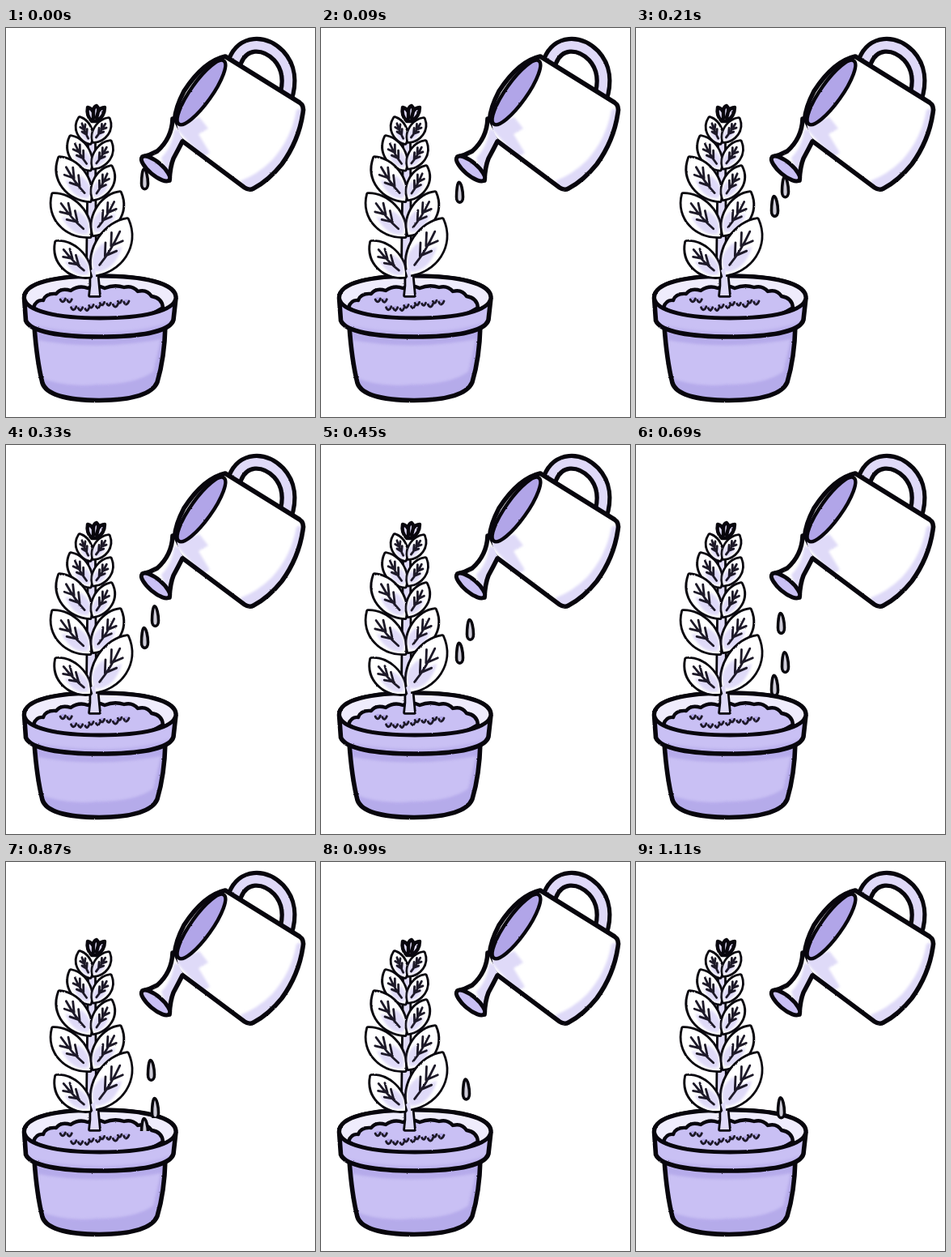
These frames come from a looping animation (382x480 px, 1170 ms). An HTML page:

```html
<!DOCTYPE html>
<html lang="en">
<head>
<meta charset="utf-8">
<title>Watering a plant</title>
<style>
  html, body { margin: 0; width: 100%; height: 100%; overflow: hidden; background: #fff; }
  svg { display: block; width: 100%; height: 100%; }
  .ink { fill: none; stroke: #08060d; stroke-width: 5.6; stroke-linecap: round; stroke-linejoin: round; }
  .fine { stroke-width: 4.4; }
  .vein { stroke-width: 2.8; stroke: #1d1928; }
  .mid { fill: #c9c0f4; }
  .pale { fill: #dfdaf8; }
  .deep { fill: #b1a5e8; }
  .white { fill: #fff; }
  .wash { filter: url(#soft); }
  .drop { fill: #cfcdd9; stroke: #08060d; stroke-width: 3.6; stroke-linejoin: round; }
</style>
</head>
<body>
<svg viewBox="0 0 382 480">
  <defs>
    <filter id="rough" x="0" y="0" width="382" height="480" filterUnits="userSpaceOnUse" color-interpolation-filters="sRGB">
      <feTurbulence type="fractalNoise" baseFrequency=".35" numOctaves="2" seed="4"/>
      <feDisplacementMap in="SourceGraphic" scale="1.6" xChannelSelector="R" yChannelSelector="G"/>
    </filter>
    <filter id="soft"><feGaussianBlur stdDeviation="1.8"/></filter>
    <path id="potBody" d="M35 368 Q38 410 45 438 Q52 459 115 459.500 Q178 459 187 437 Q196 407 197 367 Z"/>
    <path id="potRim" d="M22.500 333 C22.500 314 62 306 116 306 C170 306 210 315 210 333 L207 360 C203 375 165 381 115 381 C68 381 30 375 24.500 361 Z"/>
    <path id="mouth" d="M22.500 333 C22.500 314 62 306 116 306 C170 306 210 315 210 333 C208 350 167 358 116 358 C66 358 24 350 22.500 333 Z"/>
    <path id="soil" d="M34 345 Q37 335 46 336 Q49 327 62 328 Q68 320 80 324 Q90 317 101 321 Q112 316 122 321 Q134 316 146 320 Q156 317 163 325 Q174 322 180 331 Q193 333 194 345 Q160 366 116 366 Q67 366 34 345 Z"/>
    <path id="canBody" d="M271 35 L363 92 Q369 96 367 105 Q362 139 341 168 Q325 188 306 198 Q301 201 295 197 L216 138 Q199 118 220 78 Q244 41 271 35 Z"/>
    <path id="spout" d="M206 112 Q205 136 187 152 Q178 157 169 159 L202 188 Q203 171 207 161 Q213 150 220 141 Z"/>
    <path id="handle" d="M283 41 C293 16 319 16 337 34 C350 48 352 67 345 88"/>
    <clipPath id="bodyClip"><use href="#potBody"/></clipPath>
    <clipPath id="rimClip"><use href="#potRim"/></clipPath>
    <clipPath id="mouthClip"><use href="#mouth"/></clipPath>
    <clipPath id="canClip"><use href="#canBody"/></clipPath>
    <clipPath id="spoutClip"><use href="#spout"/></clipPath>
  </defs>

  <g filter="url(#rough)">
    <use href="#potBody" class="mid"/>
    <g clip-path="url(#bodyClip)">
      <path class="deep wash" opacity=".8" d="M30 372 Q110 396 202 370 V382 Q115 400 34 384 Z"/>
      <path class="deep wash" opacity=".8" d="M40 430 Q70 444 112 440 Q160 440 182 424 L194 374 H206 V466 H36 Z"/>
    </g>
    <use href="#potBody" class="ink"/>
    <use href="#potRim" class="mid"/>
    <path clip-path="url(#rimClip)" class="deep wash" opacity=".5" d="M20 364 Q60 374 116 375 Q172 375 211 360 V385 H20 Z"/>
    <use href="#potRim" class="ink"/>
    <use href="#mouth" fill="#efecfc"/>
    <g clip-path="url(#mouthClip)">
      <use href="#soil" class="mid"/>
      <use href="#soil" class="ink fine"/>
      <g id="pebbles"></g>
    </g>
    <use href="#mouth" class="ink" style="stroke-width:5"/>
    <g id="plant"></g>
  </g>

  <g id="drops"></g>

  <g filter="url(#rough)">
    <use href="#handle" class="ink" style="stroke-width:21"/>
    <use href="#handle" fill="none" stroke="#dfd9f8" stroke-width="10.500"/>
    <use href="#canBody" class="white"/>
    <g clip-path="url(#canClip)">
      <path class="pale wash" d="M372 98 L359 101 Q353 136 329 163 Q311 181 289 189 L300 206 Q355 187 372 98 Z"/>
      <path class="pale wash" d="M208 121 L239 110 L250 124 L238 131 L252 154 L243 160 Z"/>
    </g>
    <use href="#canBody" class="ink"/>
    <g transform="translate(241.500 79.500) rotate(-54.500)">
      <ellipse class="deep" rx="48" ry="13"/>
      <ellipse class="ink fine" rx="48" ry="13"/>
    </g>
    <use href="#spout" class="white"/>
    <path clip-path="url(#spoutClip)" class="pale wash" d="M226 132 L208 124 Q206 146 192 160 L202 188 Z"/>
    <path class="ink" d="M206 112 Q205 136 187 152 Q178 157 169 159 M202 188 Q203 171 207 161 Q213 150 218 140"/>
    <g transform="translate(185 173.500) rotate(40)">
      <ellipse class="mid" rx="22" ry="8"/>
      <ellipse class="ink" rx="22" ry="8" style="stroke-width:5"/>
    </g>
  </g>
</svg>
<script>
const NS = 'http://www.w3.org/2000/svg';
const $ = id => document.getElementById(id);

function add(parent, tag, attrs) {
  const el = document.createElementNS(NS, tag);
  for (const k in attrs) el.setAttribute(k, attrs[k]);
  parent.append(el);
  return el;
}

const path = (parent, d, cls) => add(parent, 'path', { d, class: cls });

// Runs from base to tip; p(a, c) is a of the way along and c pixels towards the underside.
function leaf(g, bx, by, tx, ty) {
  const dx = tx - bx, dy = ty - by, len = Math.hypot(dx, dy);
  const side = Math.sign(dx), w = len * .25;
  const p = (a, c) => [bx + dx * a - dy / len * c * side, by + dy * a + dx / len * c * side].map(n => n.toFixed(1)).join(' ');
  const shape = `M${p(0, 0)} C${p(.25, w * 1.3)} ${p(.75, w * 1.5)} ${p(1, 0)} C${p(.8, -w)} ${p(.3, -w * 1.3)} ${p(0, 0)} Z`;
  path(g, shape, 'ink');
  path(g, shape, 'white');
  path(g, `M${p(.06, 0)} Q${p(.2, w)} ${p(.6, w * .6)} L${p(.4, 0)} L${p(.5, -w * .5)} Q${p(.2, -w)} ${p(.06, 0)} Z`, 'pale wash');
  let veins = `M${p(.18, 0)} Q${p(.45, w * .15)} ${p(.78, 0)}`;
  for (const a of [.34, .52]) veins += `M${p(a + .16, w * .45)} L${p(a, 0)} L${p(a + .18, -w * .4)}`;
  path(g, veins, 'ink vein');
}

function drawPlant(g) {
  const stem = 'M104 330 Q108 306 101 284 L103 130 H109 L110 284 Q113 306 115 330 Z';
  path(g, stem, 'ink');
  path(g, stem, 'pale');
  const bud = 'M106 115 Q99 108 101 98 Q106 99 108 104 Q108 97 112 96 Q115 99 114 103 Q117 98 122 98 Q122 109 112 115 Z';
  path(g, bud, 'pale');
  path(g, bud + 'M108 104 V111 M114 103 L112 111', 'ink fine');
  // Each tier: left tip, right tip.
  const tiers = [[91, 111, 127, 112], [80, 134, 129, 140], [66, 160, 130, 171], [58, 205, 141, 203], [62, 264, 150, 236]];
  tiers.forEach(([lx, ly, rx, ry], i) => {
    const y = 142 + 30 * i + 2.8 * i * i;
    leaf(g, 104, y, lx, ly);
    leaf(g, 108, y - 2, rx, ry);
  });
  path(g, 'M105 299 L110 296 L112 314 L114 329 H106 L109 313 Z', 'pale');
}

function drawPebbles(g) {
  for (let i = 1; i < 13; i++) {
    const x = 62 + 92 * (i * .618 % 1), y = 334 + 13 * (i * .414 % 1), r = 2.4 + i % 3 * .4;
    add(g, 'circle', { cx: x, cy: y, r, class: 'deep' });
    path(g, `M${x - r} ${y} Q${x} ${y + r * 2} ${x + r} ${y - 1}`, 'ink vein');
  }
}

// Each drop leaves the spout at a step and falls until the soil at floor hides it.
const drops = [
  { x: 171.5, first: 0, top: 172, speed: 8, gain: .1, floor: 332 },
  { x: 184.5, first: 4, top: 182, speed: 6.8, gain: .27, floor: 316 },
  { x: 179.5, first: 10, top: 180, speed: 13, gain: -.1, floor: 319 }
];

drops.forEach((d, i) => {
  const clip = add($('drops'), 'clipPath', { id: 'fall' + i });
  add(clip, 'rect', { x: d.x - 12, y: 140, width: 24, height: d.floor - 140 });
  const g = add($('drops'), 'g', { 'clip-path': `url(#fall${i})` });
  d.el = add(g, 'g', {});
  path(d.el, 'M-1 2 C2 2 4 13 4 20 C4 29 -4 29 -4 20 C-4 13 -3 2 -1 2 Z', 'drop');
});

const LOOP = 1170, HOLD = 60;
const start = performance.now();

function frame(now) {
  const t = Math.max(0, now - start) % LOOP;
  const step = Math.floor((t + HOLD / 2) / HOLD);
  for (const d of drops) {
    const n = step - d.first;
    const y = d.top + d.speed * n + d.gain * n * n;
    d.el.setAttribute('visibility', n < -1 ? 'hidden' : 'visible');
    d.el.setAttribute('transform', `translate(${d.x} ${y.toFixed(1)})`);
  }
  requestAnimationFrame(frame);
}

drawPlant($('plant'));
drawPebbles($('pebbles'));
frame(start);
</script>
</body>
</html>
```
